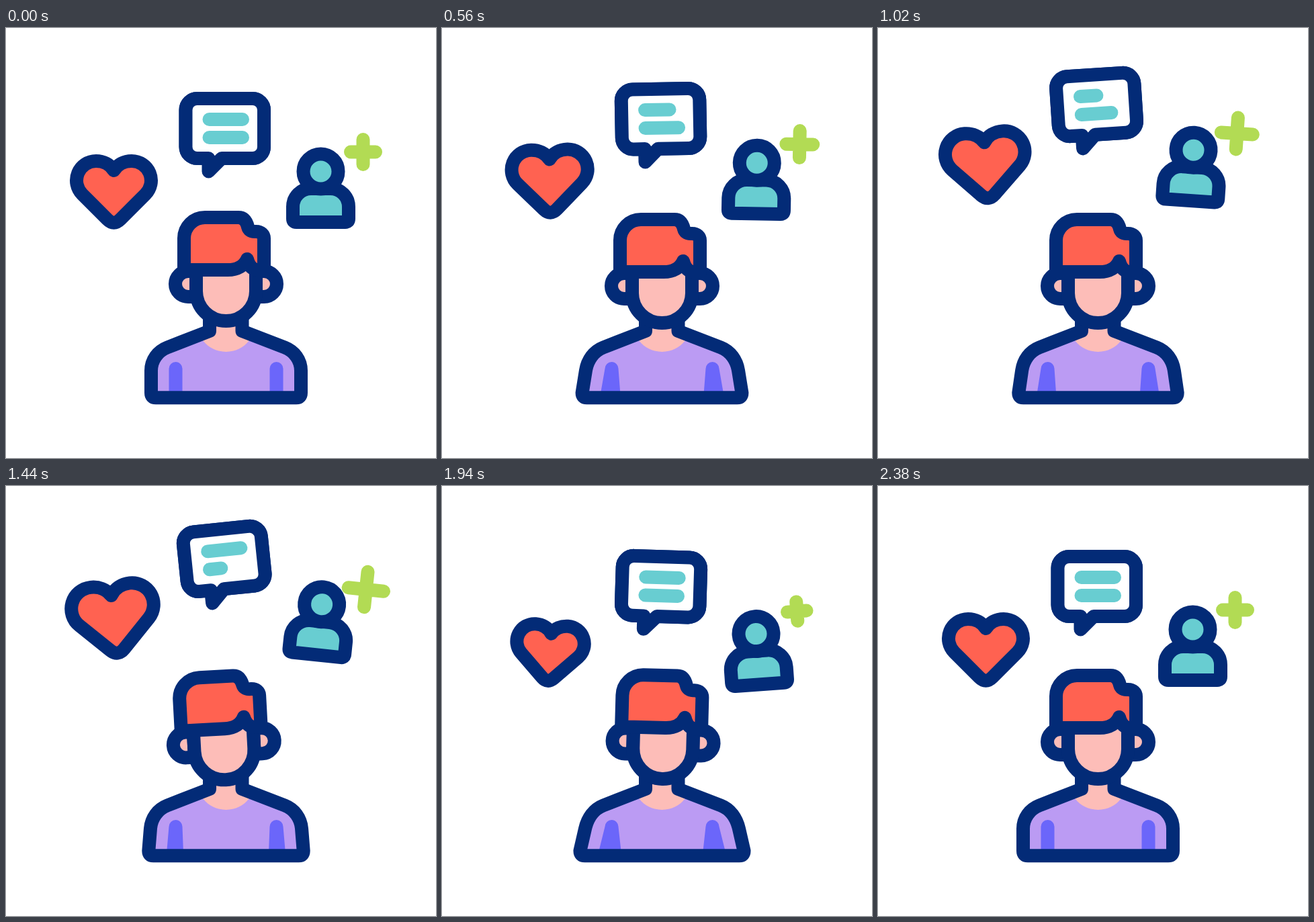
Write an HTML page that moves like this. It is 640 px wide and 640 px high and loops after 2.4 s.

```html
<!DOCTYPE html>
<html lang="en">
<head>
<meta charset="utf-8">
<title>Social activity</title>
<style>
  html, body { margin: 0; width: 100%; height: 100%; overflow: hidden; background: #fff; }
  svg { display: block; width: 640px; height: 640px; }
  .ink { stroke: #032b77; stroke-width: 20; stroke-linecap: round; stroke-linejoin: round; }
  .bar { fill: none; stroke-width: 20; stroke-linecap: round; }
  .teal { fill: #68cdd1; }
  .red { fill: #ff6251; }
  .skin { fill: #fdbdb8; }
  .arm { fill: #6b66fa; }
  .none { fill: none; }
</style>
</head>
<body>
<svg viewBox="0 0 640 640">
  <path class="torso" fill="#bb9bf3"/>
  <path id="armL" class="arm"/>
  <path id="armR" class="arm"/>
  <path class="skin" d="M303 425H352V452L362 465A43.5 43.5 0 0 1 293 465L303 452Z"/>
  <path class="torso ink none"/>

  <g id="head" class="ink">
    <path class="skin" d="M283 362H271A19 19 0 0 0 271 400H283Z"/>
    <path class="skin" d="M372 362H384A19 19 0 0 1 384 400H372Z"/>
    <path class="skin" d="M283 352V391.5A44.5 44.5 0 0 0 372 391.5V352"/>
    <path class="red" d="M265 360V313A31 31 0 0 1 296 282H346C354 282 358 288 360 296C361 300 364 303 370 303H372C380 303 384 308 384 313V360H372C365 358 361 352 359 344C355 353 345 360 330 360Z"/>
  </g>

  <g id="heart">
    <path id="heartShape" class="ink red" vector-effect="non-scaling-stroke"
      d="M113.5 247.5A29 29 0 0 1 134 198C145 198 155 203 160.5 212C166 203 176 198 187 198A29 29 0 0 1 207.5 247.5L170 285Q160.5 294.5 151 285Z"/>
  </g>

  <g id="bubble">
    <rect class="ink" fill="#fff" x="267.5" y="105" width="116.5" height="89" rx="17"/>
    <path class="ink" fill="#fff" d="M284.5 105H367A17 17 0 0 1 384 122V177A17 17 0 0 1 367 194H321L301.5 213.5V194H284.5A17 17 0 0 1 267.5 177V122A17 17 0 0 1 284.5 105Z"/>
    <path id="line1" class="bar" stroke="#68cdd1"/>
    <path id="line2" class="bar" stroke="#68cdd1"/>
  </g>

  <g id="user">
    <path class="ink teal" d="M427 266A27 27 0 0 1 454 239H483A27 27 0 0 1 510 266V284Q510 289 505 289H432Q427 289 427 284Z"/>
    <circle class="ink teal" cx="468.5" cy="213.5" r="26"/>
    <path id="plus" class="bar" stroke="#b2db54"/>
  </g>
</svg>
<script>
const LOOP = 2400;
const PEAK = 1400, LAND = 2000, REST = 2300;

const linear = x => x;
const smooth = x => x * x * (3 - 2 * x);
const sineOut = x => Math.sin(x * Math.PI / 2);
const cubicIn = x => x ** 3;

// Progress 0..1 between two times
function ramp(t, from, to, ease = smooth) {
  return ease(Math.min(1, Math.max(0, (t - from) / (to - from))));
}

// Up from a to b, back down from b to c
const pulse = (t, a, b, c) => ramp(t, a, b) - ramp(t, b, c);

const el = id => document.getElementById(id);
const setPath = (id, d) => el(id).setAttribute("d", d);
const torsos = document.querySelectorAll(".torso");

function place(id, dy, angle, cx, cy) {
  el(id).setAttribute("transform", `translate(0 ${dy}) rotate(${angle} ${cx} ${cy})`);
}

function torsoPath(s) {
  const l = 216 - s, r = 439 + s, j = s * .28, k = s * .07;
  return `M303 425V451L240 475.5C226 481 ${216 + k} 494 ${216 - j} 510L${l} 543`
    + `Q${l} 550.3 ${l + 7} 550.3H${r - 7}Q${r} 550.3 ${r} 543L${439 + j} 510`
    + `C${439 - k} 494 429 481 415 475.5L351.5 451V425`;
}

// side: -1 left, 1 right
function armPath(side, s) {
  const x = 327.5 + side * 75, out = x + side * (10 + s * .9), inn = x - side * (10 + s * .4);
  return `M${x - side * 10} 507A10 10 0 0 ${side > 0 ? 1 : 0} ${x + side * 10} 507L${out} 545H${inn}Z`;
}

function drawIcons(t) {
  const fall = ramp(t, PEAK, LAND);
  const lift = ramp(t, 320, PEAK, sineOut) - fall;
  const sway = ramp(t, 380, PEAK, linear) - fall;
  const drop = pulse(t, PEAK, LAND, REST);

  place("heart", 6 * drop - 46.5 * lift, 4.5 * drop - 6.4 * sway, 160.5, 243.5);
  const size = 1 + .11 * sway - .1 * drop;
  el("heartShape").setAttribute("transform",
    `translate(160.5 243.5) scale(${size}) translate(-160.5 -243.5)`);

  place("bubble", 1.3 * drop - 41.7 * lift, 2 * drop - 6 * sway, 325.5, 159.5);
  setPath("line1", `M302.5 136h${49.5 - 32.5 * pulse(t, 340, 850, PEAK)}`);
  setPath("line2", `M302.5 163h${49.5 - 32.5 * pulse(t, 900, PEAK, LAND)}`);

  place("user", 6.2 * drop - 35.8 * lift, 6.1 * sway - 4.4 * drop, 488.5, 228);
  const h = 18.5 + 8 * sway - 4.6 * drop;
  setPath("plus", `M${531.5 - h} 184.5h${2 * h}M531.5 ${184.5 - h}v${2 * h}`);
}

function drawPerson(t) {
  const dip = 3 * (ramp(t, 100, 420) - ramp(t, 1120, 1700));
  const tilt = 2.3 * pulse(t, 1700, LAND, REST) - 5.3 * pulse(t, 1120, 1700, LAND);
  place("head", dip, tilt, 327.5, 440);

  const spread = 7.4 * (ramp(t, 100, 440) - ramp(t, 440, 1700, cubicIn))
    + 11.7 * pulse(t, 1700, LAND, REST);
  torsos.forEach(p => p.setAttribute("d", torsoPath(spread)));
  setPath("armL", armPath(-1, spread));
  setPath("armR", armPath(1, spread));
}

const start = performance.now();
function tick() {
  const t = (performance.now() - start) % LOOP;
  drawIcons(t);
  drawPerson(t);
  requestAnimationFrame(tick);
}
tick();
</script>
</body>
</html>
```
